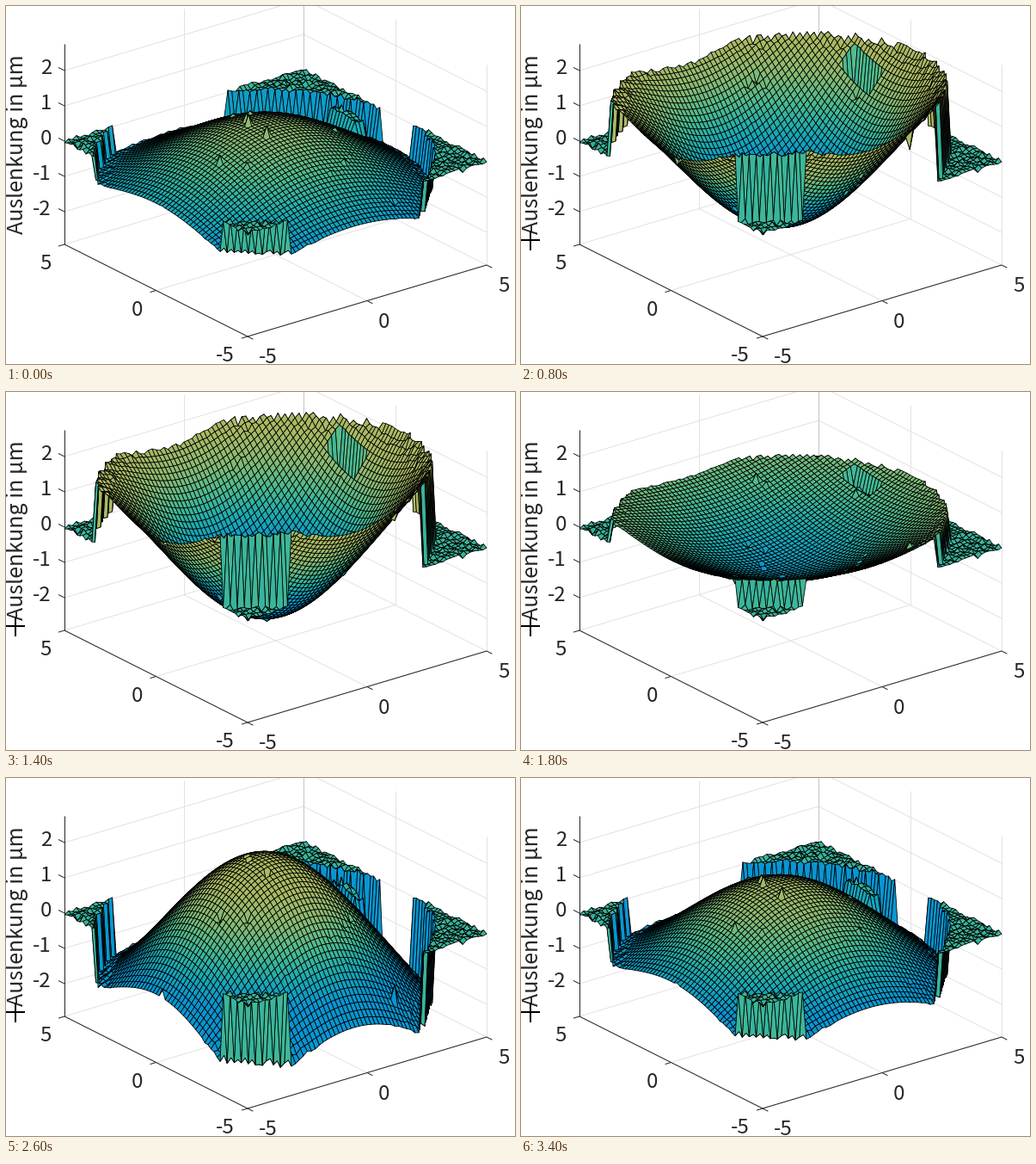
Recreate the animation shown at these times as a matplotlib script. Size 592x416 px, loop 3500 ms.

```python
import numpy as np
import matplotlib.pyplot as plt
from matplotlib.animation import FuncAnimation
from matplotlib.collections import LineCollection, PolyCollection
from matplotlib.colors import LinearSegmentedColormap, Normalize

W, H, DPI = 592, 416, 100
FRAMES, STEP = 35, 100
PX = 72 / DPI
INK = "#262626"
FONT = ["Noto Sans CJK JP", "DejaVu Sans"]
ZLO, ZHI = -120 / 41, 113 / 41


def project(x, y, z):
    """Orthographic view, in pixels from the top left corner."""
    a, b = np.add(x, 5), np.add(y, 5)
    return np.stack([281 + 27.8 * a - 21.3 * b,
                     264 - 8.3 * a - 10.7 * b - 41 * np.asarray(z)], axis=-1)


def seg(p, q):
    return [project(*p), project(*q)]


fig = plt.figure(figsize=(W / DPI, H / DPI), dpi=DPI, facecolor="white")
ax = fig.add_axes([0, 0, 1, 1])
ax.set_xlim(0, W)
ax.set_ylim(H, 0)
ax.axis("off")


def add_lines(segs, color, width, z):
    lines = LineCollection(segs, colors=color, linewidths=width * PX, zorder=z)
    ax.add_collection(lines, autolim=False)
    return lines


def label(pos, s, ha, size=24, **kw):
    ax.text(*pos, s, ha=ha, va="baseline", fontsize=size * PX, color=INK,
            family=FONT, zorder=4, **kw)


# Box, ticks and labels
grid, axes = [], [seg((-5, 5, ZHI), (-5, 5, ZLO)),
                  seg((-5, 5, ZLO), (-5, -5, ZLO)),
                  seg((-5, -5, ZLO), (5, -5, ZLO))]
for v in (-5, 0, 5):
    grid += [seg((v, 5, ZLO), (v, 5, ZHI)), seg((5, v, ZLO), (5, v, ZHI)),
             seg((v, -5, ZLO), (v, 5, ZLO)), seg((-5, v, ZLO), (5, v, ZLO))]
    axes += [seg((-5, v, ZLO), (-5.25, v, ZLO)),
             seg((v, -5, ZLO), (v, -5.3, ZLO))]
    label(project(-5, v, ZLO) + (-15, 29), f"{v}", "right")
    label(project(v, -5, ZLO) + (13, 31), f"{v}", "left")
for v in range(-2, 3):
    grid += [seg((-5, 5, v), (5, 5, v)), seg((5, 5, v), (5, -5, v))]
    axes.append(seg((-5, 5, v), (-5, 5.33, v)))
    label(project(-5, 5, v) + (-15, 4), f"{v}", "right")
add_lines(grid, "#e2e2e2", 1, 1)
add_lines([seg((5, 5, ZLO), (5, 5, ZHI))], "#c4c4c4", 1, 1)
add_lines(axes, INK, 1, 2)
label((20, 161), "Auslenkung in µm", "center", 25, rotation=90,
      rotation_mode="anchor")

# Measured membrane: a disc inside a square field with fixed corners
N = 61
RIM = 5.61
rng = np.random.default_rng(4)
axis = np.linspace(-5, 5, N)
X, Y = np.meshgrid(axis, axis, indexing="ij")
R = np.hypot(X + 0.55, Y + 0.1)
moving = R < RIM
mode = 2.3 - 2.62 * (1 - np.cos(0.42 * R))
mode += 0.015 * (X + Y) - 0.045 * (X - Y + 0.5) * (R / RIM) ** 6
mode += 0.035 * rng.standard_normal((N, N)) * (R > 5.1)
rest = 0.04 * rng.standard_normal((N, N))

# Faulty readings: one nearly still patch and scattered late points
gain = np.ones((N, N))
lag = np.zeros((N, N))
patch = (np.abs(X - 4.0) < 0.3) & (np.abs(Y - 1.35) < 0.7)
gain[patch] = rng.normal(0.15, 0.1, patch.sum())
late = (rng.random((N, N)) < 0.007) & (R < 5)
lag[late] = rng.uniform(0.08, 0.25, late.sum())
gain[late] = rng.uniform(0.8, 1, late.sum())

cmap = LinearSegmentedColormap.from_list(
    "depth", ["#0896d2", "#19abb2", "#4cbb8e", "#8abb72", "#aaba63"])
norm = Normalize(-1, 1.4, clip=True)


def surface(i):
    phase = 2 * np.pi * (i * STEP / 1000 - 2.88) / 3.5 - lag
    swing = 1.01 * np.cos(phase) + 0.04 * np.cos(3 * phase)
    z = np.where(moving, gain * mode * swing, rest)
    p = project(X, Y, z)
    quads = np.stack([p[:-1, :-1], p[1:, :-1], p[1:, 1:], p[:-1, 1:]], axis=2)
    rgb = cmap(norm(z[:-1, :-1].ravel()))
    # Reversed grid order paints from back to front
    return quads.reshape(-1, 4, 2)[::-1], rgb[::-1]


mesh = PolyCollection([], edgecolors="black", linewidths=0.8 * PX,
                      joinstyle="round", zorder=3)
ax.add_collection(mesh, autolim=False)
cursor = add_lines([[(0, 272), (22, 272)], [(11, 261), (11, 284)]],
                   "black", 2, 5)


def update(i):
    quads, rgb = surface(i)
    mesh.set_verts(quads)
    mesh.set_facecolor(rgb)
    cursor.set_visible(i > 0)
    return mesh, cursor


anim = FuncAnimation(fig, update, frames=FRAMES, interval=STEP, repeat=True)
plt.show()
```
